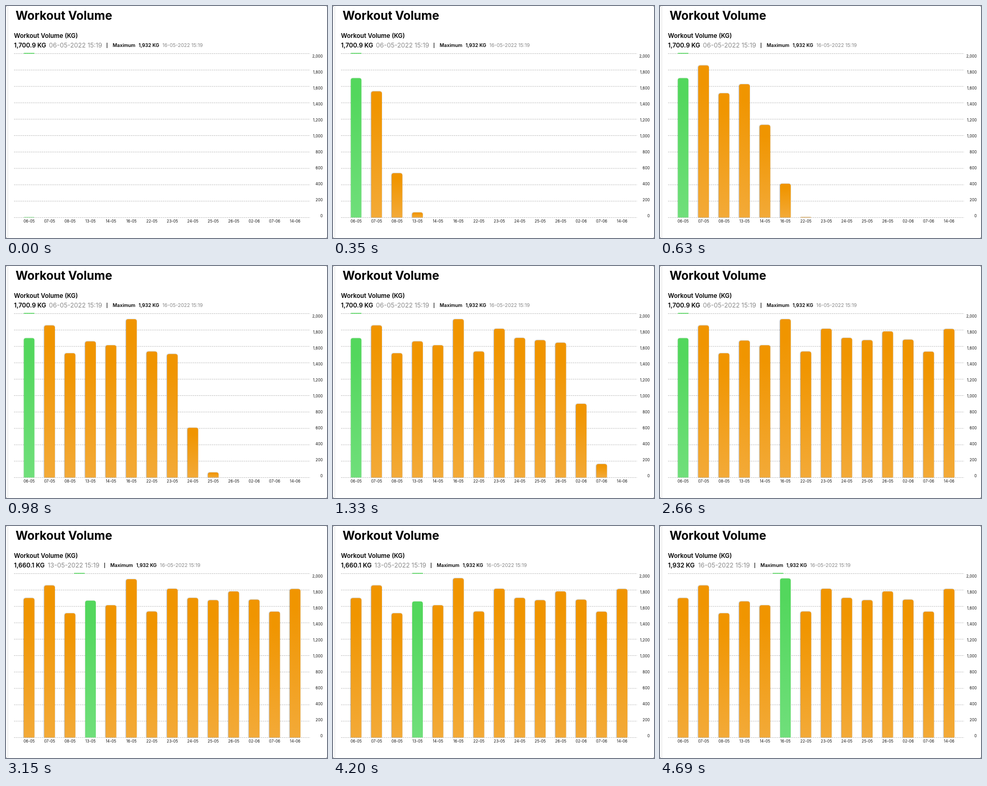
These frames come from a looping animation (604x436 px, 4760 ms). An HTML page with a canvas:

```html
<!DOCTYPE html>
<html lang="en">
<head>
<meta charset="utf-8">
<title>Workout Volume</title>
<style>
html, body { margin: 0; width: 100%; height: 100%; overflow: hidden; background: #fff; }
canvas { display: block; width: 604px; height: 436px; }
</style>
</head>
<body>
<canvas id="chart" width="604" height="436"></canvas>
<script>
const ctx = document.getElementById('chart').getContext('2d');

const LOOP = 4760;
const BASE = 397.6, TOP = 89.5, MAX = 2000;
const BAR_X = 33.5, BAR_W = 20, PITCH = 38.5;
const GROW = { start: -14, stagger: 105, time: 367 };
const MOVE_TIME = 735;
const FONT = 'Inter, Roboto, sans-serif';
const GREEN = '#53d75d';
const GREENS = [GREEN, '#70df7b'];
const ORANGES = ['#f09500', '#f3aa38'];

const data = [
  ['06-05', 1700.9], ['07-05', 1855], ['08-05', 1517], ['13-05', 1660.1],
  ['14-05', 1614], ['16-05', 1932], ['22-05', 1537], ['23-05', 1815],
  ['24-05', 1703], ['25-05', 1676], ['26-05', 1782], ['02-06', 1682],
  ['07-06', 1536], ['14-06', 1812]
];
const taps = [
  { at: 2637, from: 0, to: 3 },
  { at: 4177, from: 3, to: 5 }
];

const clamp = v => Math.min(1, Math.max(0, v));
const mix = (a, b, p) => a + (b - a) * p;
const ease = v => {
  const u = clamp(v);
  return u < 0.5 ? 2 * u * u : 1 - 2 * (1 - u) * (1 - u);
};
const barX = i => BAR_X + i * PITCH;

function fade(h, [top, bottom]) {
  const g = ctx.createLinearGradient(0, BASE - h, 0, BASE);
  g.addColorStop(0.12, top);
  g.addColorStop(1, bottom);
  return g;
}

function text(str, x, y, size, weight = 400, color = '#000', align = 'left') {
  ctx.font = `${weight} ${size}px ${FONT}`;
  ctx.textAlign = align;
  ctx.fillStyle = color;
  ctx.fillText(str, x, y);
}

function width(str, size, weight) {
  ctx.font = `${weight} ${size}px ${FONT}`;
  return ctx.measureText(str).width;
}

const valueText = i => data[i][1].toLocaleString('en-US') + ' KG';
const dateText = i => data[i][0] + '-2022 15:19';

// Left edges of the date, the divider and the maximum for a selected bar.
function headerLayout(i) {
  const date = 15 + width(valueText(i), 11.7, 600) + 5.2;
  const divider = date + width(dateText(i), 11.9, 400) + 9.6;
  return [date, divider, divider + 10.3];
}

function drawHeader(shown, from, to, p) {
  const next = headerLayout(to);
  const [date, divider, max] = headerLayout(from).map((x, i) => mix(x, next[i], p));
  text('Workout Volume', 18, 26, 22.4, 700);
  text('Workout Volume (KG)', 15, 60, 11.55, 600);
  text(valueText(shown), 15, 78, 11.7, 600);
  text(dateText(shown), date, 78, 11.9, 400, '#8a8a8a');
  ctx.fillStyle = '#222';
  ctx.fillRect(divider - 1, 69, 1.2, 10);
  text('Maximum', max, 77, 9, 600);
  const best = max + width('Maximum', 9, 600) + 6;
  text(valueText(5), best, 77, 9, 600);
  text(dateText(5), best + width(valueText(5), 9, 600) + 6, 77, 9.3, 400, '#8a8a8a');
}

function drawAxes() {
  ctx.strokeStyle = '#c8c8c8';
  ctx.lineWidth = 1;
  ctx.setLineDash([3, 1]);
  for (let i = 0; i <= 10; i++) {
    const y = mix(TOP, BASE, i / 10);
    ctx.beginPath();
    ctx.moveTo(15, y);
    ctx.lineTo(572, y);
    ctx.stroke();
    text((MAX - i * 200).toLocaleString('en-US'), 596, 97 + i * 29.97, 7.2, 400, '#111', 'right');
  }
  ctx.setLineDash([]);
  data.forEach(([day], i) => text(day, barX(i) + BAR_W / 2, 407.3, 7.2, 400, '#111', 'center'));
}

function drawBar(i, h, selected) {
  if (h <= 0) return;
  const r = Math.min(4, h);
  ctx.save();
  ctx.shadowColor = selected ? 'rgba(0,0,0,.12)' : 'rgba(40,50,70,.5)';
  ctx.shadowOffsetX = -0.5;
  ctx.shadowBlur = 2;
  ctx.fillStyle = fade(h, selected ? GREENS : ORANGES);
  ctx.beginPath();
  ctx.roundRect(barX(i), BASE - h, BAR_W, h, [r, r, 0, 0]);
  ctx.fill();
  ctx.restore();
}

// A tapped bar stands slightly taller until it settles.
function lift(i, t) {
  const tap = taps.find(s => s.to === i);
  if (!tap || t < tap.at) return 0;
  return 1.7 * (1 - ease((t - tap.at - 400) / 600));
}

function drawFrame() {
  ctx.strokeStyle = '#e2e2e2';
  ctx.lineWidth = 1;
  ctx.beginPath();
  ctx.moveTo(3.5, 0);
  ctx.lineTo(3.5, 436);
  ctx.stroke();
  ctx.fillStyle = '#555';
  for (const [x, y] of [[0, 0], [603, 0], [0, 435], [603, 435]]) ctx.fillRect(x, y, 1, 1);
}

function draw(t) {
  const tap = taps.filter(s => t >= s.at).pop() || { at: 0, from: 0, to: 0 };
  const p = ease((t - tap.at) / MOVE_TIME);
  const shown = t - tap.at > 50 ? tap.to : tap.from;

  ctx.fillStyle = '#fff';
  ctx.fillRect(0, 0, 604, 436);
  drawFrame();
  drawHeader(shown, tap.from, tap.to, p);
  drawAxes();
  data.forEach(([, value], i) => {
    const grown = ease((t - GROW.start - i * GROW.stagger) / GROW.time);
    drawBar(i, grown * value / MAX * (BASE - TOP) + lift(i, t), i === shown);
  });
  ctx.fillStyle = GREEN;
  ctx.fillRect(mix(barX(tap.from), barX(tap.to), p), 88.2, BAR_W, 1.5);
}

const begin = performance.now();
function tick() {
  draw((performance.now() - begin) % LOOP);
  requestAnimationFrame(tick);
}
tick();
</script>
</body>
</html>
```
